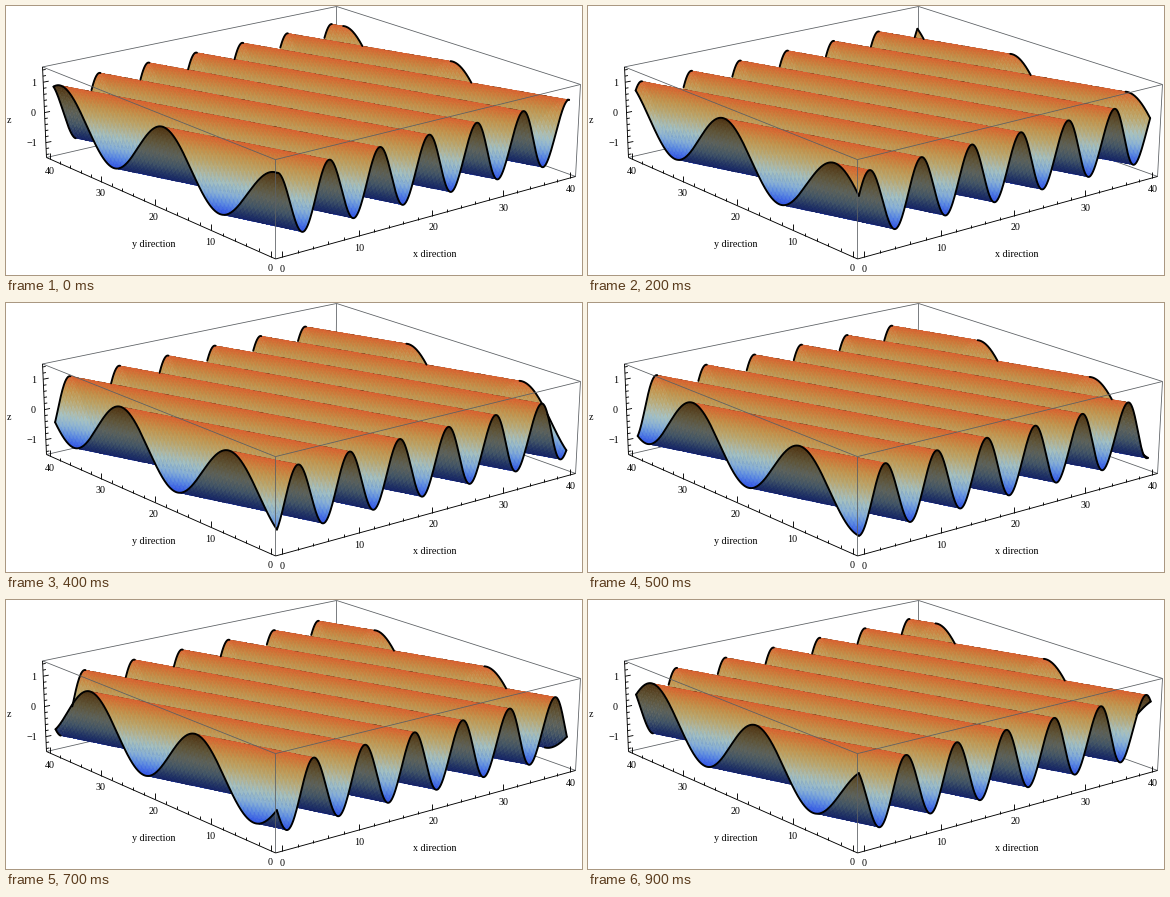
A matplotlib script that plays this animation: 576x269 px, repeating every 1000 ms.

```python
import numpy as np
import matplotlib.pyplot as plt
from matplotlib.animation import FuncAnimation
from matplotlib.collections import LineCollection, PolyCollection
from matplotlib.colors import LinearSegmentedColormap

W, H, DPI = 576, 269, 64
PX = 72 / DPI  # one pixel in points
FRAMES, INTERVAL = 10, 100
SIZE = 40
LO, HI, ZMAX = -0.8, 40.8, 1.5
KX, KY = np.cos(1 / 3), np.sin(1 / 3)
NX, NY = 220, 90

# Box corners (x, y, z) and where they fall on the stage.
CORNERS = {
    (LO, LO, ZMAX): (269, 153), (LO, LO, -ZMAX): (269, 252.5),
    (LO, HI, ZMAX): (36, 60.5), (LO, HI, -ZMAX): (40, 151),
    (HI, LO, ZMAX): (574, 78), (HI, LO, -ZMAX): (569, 170),
    (HI, HI, ZMAX): (330, 0), (HI, HI, -ZMAX): (329.4, 84.3),
}


def fit_camera():
    """Least-squares perspective matrix from the box corners."""
    rows, rhs = [], []
    for (x, y, z), (u, v) in CORNERS.items():
        rows.append([x, y, z, 1, 0, 0, 0, 0, -u * x, -u * y, -u * z])
        rows.append([0, 0, 0, 0, x, y, z, 1, -v * x, -v * y, -v * z])
        rhs += [u, v]
    solution = np.linalg.lstsq(np.array(rows), np.array(rhs), rcond=None)[0]
    return np.append(solution, 1).reshape(3, 4)


CAMERA = fit_camera()
EYE = np.linalg.solve(CAMERA[:, :3], -CAMERA[:, 3])


def project(x, y, z):
    x, y, z = np.broadcast_arrays(x, y, z)
    p = np.stack([x, y, z, np.ones_like(x, dtype=float)], axis=-1) @ CAMERA.T
    return p[..., :2] / p[..., 2:]


def wave(x, y, phase):
    return np.cos(KX * x + KY * y - phase)


def visible(x, y, z, phase):
    """True where the sight line to the eye does not cross the surface."""
    points = np.stack(np.broadcast_arrays(x, y, z), axis=-1)
    sight = EYE - points
    sight /= np.hypot(sight[:, 0], sight[:, 1])[:, None]
    steps = np.linspace(0.15, 60, 260)[None, :, None]
    ray = points[:, None] + steps * sight[:, None]
    rx, ry, rz = np.moveaxis(ray, -1, 0)
    outside = (rx < 0) | (ry < 0) | (rx > SIZE) | (ry > SIZE)
    gap = rz - wave(rx, ry, phase)
    return (outside | (gap > 0)).all(axis=1) | (outside | (gap < 0)).all(axis=1)


def ramp(name, stops):
    colors = [((z + 1) / 2, np.array(rgb) / 255) for z, rgb in stops]
    return LinearSegmentedColormap.from_list(name, colors)


UPPER = ramp("upper", [
    (-1, (48, 84, 228)), (-0.75, (88, 135, 224)), (-0.5, (132, 173, 212)),
    (-0.2, (164, 192, 194)), (0, (176, 183, 160)), (0.3, (187, 167, 110)),
    (0.6, (195, 149, 78)), (0.85, (208, 122, 58)), (1, (221, 101, 51))])
LOWER = ramp("lower", [
    (-1, (20, 32, 100)), (-0.75, (32, 50, 98)), (-0.4, (66, 84, 100)),
    (0, (92, 97, 90)), (0.4, (94, 84, 56)), (0.8, (84, 60, 27)),
    (1, (70, 44, 16))])

fig = plt.figure(figsize=(W / DPI, H / DPI), dpi=DPI, facecolor="white")
ax = fig.add_axes([0, 0, 1, 1])
ax.set_xlim(-0.5, W - 0.5)
ax.set_ylim(H - 0.5, -0.5)
ax.axis("off")


def add_lines(segments, color, width, zorder):
    ax.add_collection(LineCollection(segments, colors=color,
                                     linewidths=width * PX, zorder=zorder))


def box_edge(a, b):
    return [project(*a), project(*b)]


def label(x, y, text):
    ax.text(x, y, text, family="Liberation Serif", fontsize=10 * PX,
            ha="center", va="center_baseline", zorder=6)


def draw_box():
    def corner(x, y, top):
        return (x, y, ZMAX if top else -ZMAX)

    front, left = (LO, LO), (LO, HI)
    right, back = (HI, LO), (HI, HI)

    def edge(p, q, top):
        return box_edge(corner(*p, top), corner(*q, top))

    def post(p):
        return box_edge(corner(*p, True), corner(*p, False))

    gray = "#5c6064"
    add_lines([edge(left, back, True), edge(back, right, True), post(back),
               edge(left, back, False), edge(back, right, False)],
              gray, 0.8, 1)
    add_lines([edge(front, left, True), edge(front, right, True),
               post(front), post(right)], gray, 0.8, 5)
    add_lines([edge(front, left, False), edge(front, right, False),
               post(left)], "black", 0.9, 5)


def draw_axes():
    ticks = []
    for value in range(0, SIZE + 1, 2):
        major = value % 10 == 0
        rise = np.array([0, -6 if major else -3])
        on_x = project(value, LO, -ZMAX)
        on_y = project(LO, value, -ZMAX)
        ticks += [(on_x, on_x + rise), (on_y, on_y + rise)]
        if major:
            label(on_x[0] + 0.7, on_x[1] + 11, str(value))
            label(on_y[0] - 1, on_y[1] + 11, str(value))
    for i in range(-7, 8):
        start = project(LO, HI, i / 5)
        length = 5.5 if i % 5 == 0 else 3
        ticks.append((start, start + np.array([length, -0.2 * length])))
        if i % 5 == 0:
            label(27 if i >= 0 else 25.5, start[1] + 0.3,
                  str(i // 5).replace("-", "\u2212"))
    add_lines(ticks, "black", 0.9, 5)
    label(428, 247, "x direction")
    label(147, 237, "y direction")
    label(2, 113, "z")


draw_box()
draw_axes()

# Cells run from far to near, so later ones cover earlier ones.
GX, GY = np.meshgrid(np.linspace(SIZE, 0, NX + 1), np.linspace(SIZE, 0, NY + 1))
MID_X = (GX[:-1, :-1] + GX[1:, 1:]) / 2
MID_Y = (GY[:-1, :-1] + GY[1:, 1:]) / 2

surface = PolyCollection([], edgecolors="face", linewidths=0.5 * PX, zorder=2)
ax.add_collection(surface)

along = np.linspace(0, SIZE, 500)
RIM = [(along, 0 * along, False), (0 * along, along, False),
       (along, 0 * along + SIZE, True), (0 * along + SIZE, along, True)]
rim_lines = [ax.plot([], [], color="black", lw=1.9 * PX, zorder=4,
                     solid_capstyle="round", solid_joinstyle="round")[0]
             for _ in RIM]


def update(frame):
    phase = 2 * np.pi * frame / FRAMES
    grid = project(GX, GY, wave(GX, GY, phase))
    quads = np.stack([grid[:-1, :-1], grid[:-1, 1:], grid[1:, 1:],
                      grid[1:, :-1]], axis=2).reshape(-1, 4, 2)
    d1, d2 = quads[:, 2] - quads[:, 0], quads[:, 3] - quads[:, 1]
    facing_up = d1[:, 0] * d2[:, 1] - d1[:, 1] * d2[:, 0] < 0
    level = (wave(MID_X, MID_Y, phase).ravel() + 1) / 2
    surface.set_verts(quads)
    surface.set_facecolor(np.where(facing_up[:, None], UPPER(level), LOWER(level)))

    for line, (x, y, far) in zip(rim_lines, RIM):
        z = wave(x, y, phase)
        u, v = project(x, y, z).T
        if far:
            v = np.where(visible(x, y, z, phase), v, np.nan)
        line.set_data(u, v)
    return [surface, *rim_lines]


anim = FuncAnimation(fig, update, frames=FRAMES, interval=INTERVAL,
                     repeat=True, repeat_delay=0, blit=False)
plt.show()
```
